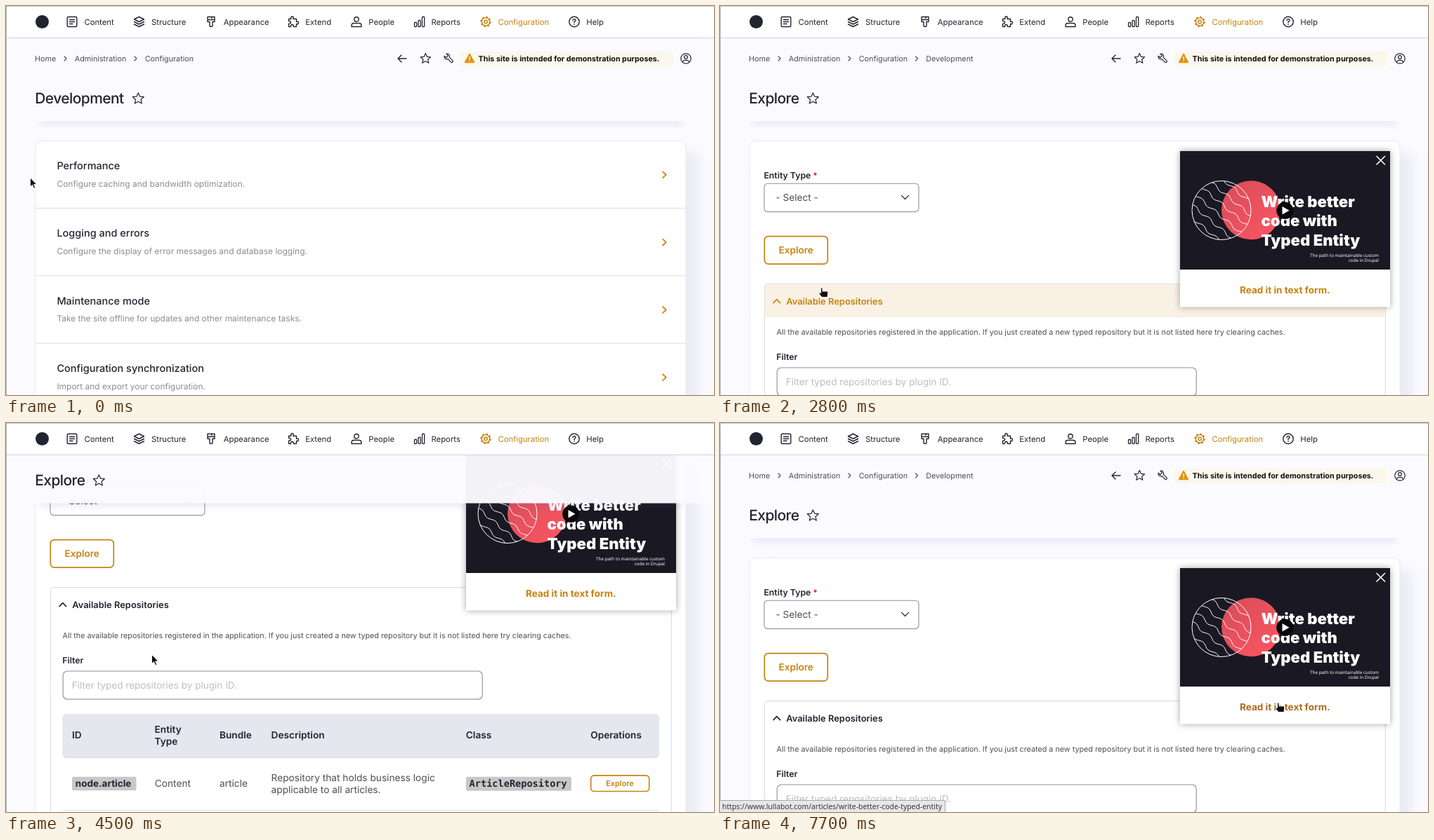
Write an HTML page that moves like this. It is 1008 by 555 pixels and loops after 8 s.

```html
<!DOCTYPE html>
<html lang="en">
<head>
<meta charset="utf-8">
<title>Typed entity explorer</title>
<style>
  html, body { margin: 0; width: 100%; height: 100%; overflow: hidden; background: #fafaff; }
  svg { position: absolute; left: 0; top: 0; font-family: Inter, sans-serif; text-rendering: geometricPrecision; }
  #status {
    position: absolute; left: 0; bottom: 0; height: 16px; padding: 0 4px 0 3px;
    border: solid #a8a8aa; border-width: 1px 1px 0 0; border-top-right-radius: 3px;
    background: #e7e7e9; color: #35353a; font: 10.4px/16px "Noto Sans", sans-serif; white-space: nowrap;
  }
</style>
</head>
<body>
<svg id="stage" width="1008" height="555" viewBox="0 0 1008 555"></svg>
<div id="status"></div>
<script>
const INK = '#232430', SOFT = '#4d4e59', GREY = '#8b8c93', ACCENT = '#c5830f', LINE = '#dcdde3';
const ROW_TOP = 192, ROW_HEIGHT = 96.4;

const text = (x, y, str, size, weight = 400, fill = INK, extra = '') =>
  `<text x="${x}" y="${y}" font-size="${size}" font-weight="${weight}" fill="${fill}" ${extra}>${str}</text>`;
const box = (x, y, w, h, fill, r = 0, stroke = 'none', sw = 1, extra = '') =>
  `<rect x="${x}" y="${y}" width="${w}" height="${h}" rx="${r}" fill="${fill}" stroke="${stroke}" stroke-width="${sw}" ${extra}/>`;
const stroke = (d, color = INK, w = 1.4, extra = '') =>
  `<path d="${d}" fill="none" stroke="${color}" stroke-width="${w}" stroke-linecap="round" stroke-linejoin="round" ${extra}/>`;
const circle = (x, y, r, color = INK, w = 1.4) =>
  `<circle cx="${x}" cy="${y}" r="${r}" fill="none" stroke="${color}" stroke-width="${w}"/>`;
const at = (x, y, content) => `<g transform="translate(${x} ${y})">${content}</g>`;
const middle = 'text-anchor="middle"';

function star(x, y, r) {
  const points = Array.from({ length: 10 }, (_, i) => {
    const a = i * Math.PI / 5, d = i % 2 ? r * 0.47 : r;
    return `${(x + d * Math.sin(a)).toFixed(2)} ${(y - d * Math.cos(a)).toFixed(2)}`;
  });
  return stroke(`M${points.join('L')}Z`, INK, 1.2);
}

// Toolbar
const person = circle(0, -3.6, 3.2) + stroke('M-7 7V5.5Q-7 2-3.5 2H3.5Q7 2 7 5.5V7Z');
const nav = [
  ['Content', 94, 111.4, box(-6.8, -7, 13.6, 14, 'none', 1.5, INK, 1.4) + stroke('M-3.5-3H3.5M-3.5 0H3.5M-3.5 3H1')],
  ['Structure', 189.5, 207, stroke('M0-7L7-3.5 0 0-7-3.5ZM-7 0L0 3.5 7 0M-7 3.5L0 7 7 3.5')],
  ['Appearance', 292, 309.7, stroke('M-5-7H5V0H2V5.5Q2 7 0 7T-2 5.5V0H-5ZM-5-3H5M1-7V-5')],
  ['Extend', 408.5, 426.2, stroke('M-6-4H-2.5Q-3.5-7.5-1-7.5T.5-4H5V0Q8-.8 8 1.5T5 3V7H1Q1 4-1 4T-3 7H-6V3Q-3 3-3 1T-6-1Z')],
  ['People', 499, 516.3, person],
  ['Reports', 588.5, 605.5, [-5.5, 0, 5.5].map((x, i) => box(x - 1.5, [1, -2, -7][i], 3.2, [6, 9, 14][i], 'none', 1, INK, 1.3)).join('')],
  ['Configuration', 683, 700.4, circle(0, 0, 2.3, ACCENT) + circle(0, 0, 5.6, ACCENT) +
    `<circle r="6.8" fill="none" stroke="${ACCENT}" stroke-width="1.8" stroke-dasharray="2.7 2.64"/>`],
  ['Help', 809, 826.3, circle(0, 0, 7.2) + stroke('M-2-1.8Q-1.8-3.8 0-3.8T2-2Q2-.8 0 .2V1.2') + stroke('M0 3.6V3.7', INK, 1.6)],
];
const toolbar = box(0, 0, 1008, 45, '#fff') + box(0, 45, 1008, 1, '#d3d4da') +
  `<circle cx="51.5" cy="22.5" r="9.5" fill="${INK}"/>` +
  nav.map(([label, iconX, x, icon]) => at(iconX, 22.5, icon) +
    text(x, 27, label, 11.3, 400, label === 'Configuration' ? ACCENT : INK)).join('');

// Breadcrumb bar
const crumbs = [['Home', 41], ['Administration', 97.8], ['Configuration', 197.7], ['Development', 293.2]];
const wrench = stroke('M-1.6-.5V6Q-1.6 7.6 0 7.6T1.6 6V-.5Q4-1.5 4-4 4-6 2-7V-3.5H-2V-7Q-4-6-4-4-4-1.5-1.6-.5Z', INK, 1.2, 'transform="rotate(-45)"');
const breadcrumb = count => crumbs.slice(0, count).map(([label, x], i) =>
  text(x, 78.7, label, 10.8, 400, SOFT) + (i ? stroke(`M${x - 14.7} 72l3 3-3 3`, SOFT, 1.2) : '')).join('') +
  stroke('M570 75H558.5M563 70l-5 5 5 5') + star(597.3, 75.2, 7.6) + at(630.5, 74.8, wrench) +
  box(647, 65, 303, 21, '#fcf7ec', 3) +
  `<path d="M660 68.5L666.4 80.5H653.6Z" fill="#e39314" stroke="#e39314" stroke-width="1.6" stroke-linejoin="round"/>` +
  stroke('M660 72.5V76.2M660 78.7V78.8', '#fff', 1.4) +
  text(672.6, 78.8, 'This site is intended for demonstration purposes.', 10.75, 700, '#111') +
  circle(968, 75, 7.2, INK, 1.2) + circle(968, 73, 2.4, INK, 1.2) + stroke('M963.5 80Q964 77.3 968 77.3T972.5 80', INK, 1.2);

const card = bottom =>
  box(59, 209, 926, bottom - 192, '#eaecf4', 10, 'none', 0, 'filter="url(#blur8)"') +
  box(42, 192.5, 926, bottom - 192, '#fff', 9, '#e8e9f0');

const stickyTitle = (label, starX) => box(0, 96, 1008, 68.5, '#fafaff', 0, 'none', 0, 'opacity=".965"') +
  `<g clip-path="url(#below)">${box(48, 150, 914, 19, '#5a679c', 0, 'none', 0, 'opacity=".13" filter="url(#blur5)"')}</g>` +
  text(41.3, 138.6, label, 21, 500, INK, 'letter-spacing="-.6"') + star(starX, 132.3, 8.4);

// Development page
const items = [
  ['Performance', 'Configure caching and bandwidth optimization.', 'performance'],
  ['Logging and errors', 'Configure the display of error messages and database logging.', 'logging'],
  ['Maintenance mode', 'Take the site offline for updates and other maintenance tasks.', 'maintenance'],
  ['Configuration synchronization', 'Import and export your configuration.', 'configuration'],
  ['Devel settings', 'Helper functions, pages, and blocks to assist Drupal developers. The devel blocks can be managed via the block administration page.', 'devel'],
  ['Explore Typed Entity', 'Explore the classes associated with each entity type and bundle pair.', 'typed-entity'],
];
const listPage = hovered => breadcrumb(3) + card(771) + items.map(([name, info], i) => {
  const y = ROW_TOP + i * ROW_HEIGHT, on = i === hovered;
  return (i ? box(42, y - 0.5, 926, 1, LINE) : '') +
    (on ? box(52.5, y + 11, 905.5, 74.6, '#f5ebd8', 6) : '') +
    text(72.4, y + 40.8, name, 14.5, 500, on ? ACCENT : INK) +
    text(72.4, y + 65.6, info, 11.97, 400, on ? ACCENT : GREY) +
    stroke(`M935 ${y + 44.3}l4.8 4.4-4.8 4.4`, ACCENT, 1.7);
}).join('');

// Explore page
function waves() {
  let d = '';
  for (let row = -2.5; row <= 2.5; row++)
    for (let x = -45; x <= 45; x += 3)
      d += `${x === -45 ? 'M' : 'L'}${x} ${(row * 14 + 2 * Math.sin(x / 4)).toFixed(1)}`;
  return `<g clip-path="url(#disc)">${stroke(d, '#fff', 0.9, 'transform="rotate(40)"')}</g>` + circle(0, 0, 42, '#fff', 1);
}
const video = linkHover => box(655, 207, 299, 222.5, '#555', 0, 'none', 0, 'opacity=".55" filter="url(#blur5)"') +
  box(655, 207, 299, 222.5, '#fff') + box(655, 207, 299, 169, '#1a1823') +
  `<circle cx="756" cy="291.3" r="42" fill="url(#coral)"/>` + at(714, 291.5, waves()) +
  ['Write better', 'code with', 'Typed Entity'].map((s, i) => text(770.5, 286.7 + i * 27.6, s, 22.1, 900, '#fff')).join('') +
  ['The path to maintainable custom', 'code in Drupal'].map((s, i) =>
    text(938, 358 + i * 7, s, 6.3, 400, '#fff', 'text-anchor="end" font-family="Noto Sans, sans-serif"')).join('') +
  `<circle cx="804.3" cy="291.8" r="12.2" fill="#08080a"/><path d="M800.5 286L810.5 291.8 800.5 297.6Z" fill="#fff"/>` +
  stroke('M935 214.5l11.5 11.5M946.5 214.5L935 226', '#fff', 1.6) +
  text(804.3, 410.1, 'Read it in text form.', 13.55, 700, linkHover ? '#ad6a1c' : ACCENT, middle);

function tableRow(y, id, idWidth, type, bundle, noun, className, classWidth) {
  return box(94, y - 9.5, idWidth, 19.5, '#c8c8ca', 2) + text(98.8, y + 4.8, id, 13.5, 700) +
    text(211.8, y + 4.8, type, 13.7, 400, SOFT) + text(304, y + 4.8, bundle, 13.7, 400, SOFT) +
    text(377.6, y - 3.4, 'Repository that holds business logic', 13.7, 400, SOFT) +
    text(377.6, y + 14, `applicable to all ${noun}.`, 13.7, 400, SOFT) +
    box(655, y - 9.5, classWidth, 20, '#c8c8ca', 2) +
    text(659.6, y + 4.3, className, 13.6, 700, INK, 'font-family="DejaVu Sans Mono, monospace"') +
    box(832.7, y - 11.3, 83, 22.6, '#fff', 4.5, ACCENT, 1.6) + text(874, y + 4, 'Explore', 10.9, 600, ACCENT, middle) +
    box(81, y + 38, 849, 1, LINE);
}
const explorePage = (summaryHover, inputHover, linkHover) => breadcrumb(4) + card(844) +
  text(62.4, 245.7, 'Entity Type', 12.3, 600) + text(132.3, 246.2, '*', 12, 600, '#d72222') +
  box(63, 255, 220, 40, '#000', 5, 'none', 0, 'opacity=".08"') +
  box(63, 253.2, 220, 40.3, '#fff', 5, '#8f929c', 1.1) + text(79.5, 277.7, '- Select -', 13.6, 400, SOFT) +
  stroke('M258.5 270.3l5 5.2 5-5.2', INK, 1.2) +
  box(63.3, 328.6, 90, 39.5, '#fff', 5.5, ACCENT, 1.7) + text(108.2, 353, 'Explore', 13.6, 600, ACCENT, middle) +
  box(63.3, 396.7, 884, 416, '#fff', 5, '#d6d8df') +
  (summaryHover ? box(63.8, 397.2, 883, 47, '#f9f1e4', 4) : '') +
  stroke('M76 423.6l4.8-5 4.8 5', summaryHover ? ACCENT : INK, 1.6) +
  text(94.2, 425.5, 'Available Repositories', 12.9, 600, summaryHover ? ACCENT : INK) +
  text(80.6, 469.3, 'All the available repositories registered in the application. If you just created a new typed repository but it is not listed here try clearing caches.', 10.77, 400, SOFT) +
  text(80.2, 505, 'Filter', 12.3, 600) +
  box(81, 518, 597.5, 39.5, '#000', 6, 'none', 0, 'opacity=".07"') +
  box(81.2, 516, 597, 40, '#fff', 6, inputHover ? INK : '#8f929c', inputHover ? 1.8 : 1.1) +
  text(93.8, 540.6, 'Filter typed repositories by plugin ID.', 13.55, 400, '#bdbec5') +
  box(80.5, 578.5, 849.5, 61.5, '#d9dce4', 6) + box(80.5, 577, 849.5, 61.5, '#e4e7ee', 6) +
  [['ID', 94], ['Bundle', 304], ['Description', 377.6], ['Class', 654.8], ['Operations', 832.2]]
    .map(([s, x]) => text(x, 612.3, s, 13.65, 600)).join('') +
  text(211.6, 604, 'Entity', 13.65, 600) + text(211.6, 621, 'Type', 13.65, 600) +
  tableRow(676.2, 'node.article', 91.5, 'Content', 'article', 'articles', 'ArticleRepository', 150) +
  tableRow(753.4, 'user', 40, 'User', '', 'users', 'UserRepository', 125) + video(linkHover);

// Pointers, with the hot spot at 0,0
const outline = 'fill="#111" stroke="#fff" stroke-width=".9" stroke-linejoin="round"';
const ibeam = 'M-3-6.5Q0-6.5 0-5 0-6.5 3-6.5M0-5V5M-3 6.5Q0 6.5 0 5 0 6.5 3 6.5';
const pointers = {
  arrow: `<path d="M0 0V13L3 10.3 5.2 15.2 7.3 14.2 5.2 9.5H9.3Z" ${outline}/>`,
  hand: `<path d="M-1.4 1.2Q-1.4 0-.2 0T1 1.2V5H7.5Q9 5.2 8.8 7L8 13.5H0L-3.8 9Q-4.4 7.2-2.8 7L-1.4 7.6Z" ${outline}/>`,
  ibeam: stroke(ibeam, '#fff', 2.4) + stroke(ibeam, '#222', 1.1),
};

// Motion: [time, ...values], linear between keys
const listScroll = [[0, 0], [300, 0], [500, 130], [700, 285], [800, 312]];
const exploreScroll = [[0, 0], [3500, 0], [3700, 90], [3900, 262], [4000, 289.5], [4300, 289.5], [4500, 162], [4800, 0]];
const pointerPath = [
  [0, 34.5, 245], [100, 34.5, 245], [500, 185, 240], [1000, 185, 238], [1500, 191, 388], [2000, 191, 388],
  [2500, 150, 412], [2700, 150, 412], [2800, 145, 402], [3000, 145, 402], [3400, 206, 346], [3500, 206, 346],
  [3700, 207.5, 330.5], [4700, 207.5, 330.5], [5200, 726, 232], [5400, 802, 208], [5600, 960, 230],
  [5800, 985, 460], [6000, 948, 296], [6100, 948, 296], [6200, 700, 240], [6300, 428, 296], [6400, 428, 296],
  [6500, 403, 338], [7100, 403, 338], [7400, 795, 399],
];
function track(keys, t) {
  const next = keys.findIndex(k => k[0] > t);
  if (next < 0) return keys[keys.length - 1].slice(1);
  const a = keys[next - 1], b = keys[next], p = (t - a[0]) / (b[0] - a[0]);
  return a.slice(1).map((v, i) => v + (b[i + 1] - v) * p);
}

const defs = `<defs>
  <filter id="blur5" x="-10%" y="-200%" width="120%" height="500%"><feGaussianBlur stdDeviation="5"/></filter>
  <filter id="blur8" x="-10%" y="-10%" width="120%" height="120%"><feGaussianBlur stdDeviation="8"/></filter>
  <clipPath id="below"><rect x="0" y="164.5" width="1008" height="30"/></clipPath>
  <clipPath id="disc"><circle r="42"/></clipPath>
  <linearGradient id="coral" x1="0" y1="0" x2="1" y2="1"><stop stop-color="#d44c59"/><stop offset="1" stop-color="#ff5663"/></linearGradient>
</defs>`;
const stage = document.getElementById('stage'), status = document.getElementById('status');
let shown = -1;

function draw(t) {
  const onList = t < 2200;
  const [scroll] = track(onList ? listScroll : exploreScroll, t);
  const [x, y] = track(pointerPath, t);
  const over = (x0, y0, x1, y1) => x >= x0 && x <= x1 && y + scroll >= y0 && y + scroll <= y1;
  let page, pointer = 'arrow', url = '';

  if (onList) {
    const row = items.findIndex((_, i) => over(53, ROW_TOP + i * ROW_HEIGHT, 958, ROW_TOP + (i + 1) * ROW_HEIGHT));
    page = listPage(row);
    if (row >= 0) {
      pointer = 'hand';
      url = 'local.contrib.com/en/admin/config/development/' + items[row][2];
    }
  } else {
    const summary = scroll === 0 && over(63, 397, 654, 444);
    const input = t >= 3800 && t < 4200;
    page = explorePage(summary, input, over(740, 397, 869, 414));
    if (input) pointer = 'ibeam';
    else if (summary || over(655, 207, 954, 430)) pointer = 'hand';
    if (t >= 7600) url = 'https://www.lullabot.com/articles/write-better-code-typed-entity';
  }

  stage.innerHTML = defs + box(0, 0, 1008, 555, '#fafaff') + at(0, -scroll, page) +
    at(0, -Math.min(scroll, 50), onList ? stickyTitle('Development', 188.3) : stickyTitle('Explore', 132.3)) +
    toolbar + box(0, 0, 1008, 1, '#c9c9cc') + box(0, 0, 1, 555, '#b4b4b8') + at(x, y, pointers[pointer]);
  status.textContent = url;
  status.hidden = !url;
}

function tick() {
  const t = Math.floor(performance.now() % 8000 / 100) * 100;
  if (t !== shown) draw(shown = t);
  requestAnimationFrame(tick);
}
tick();
</script>
</body>
</html>
```
